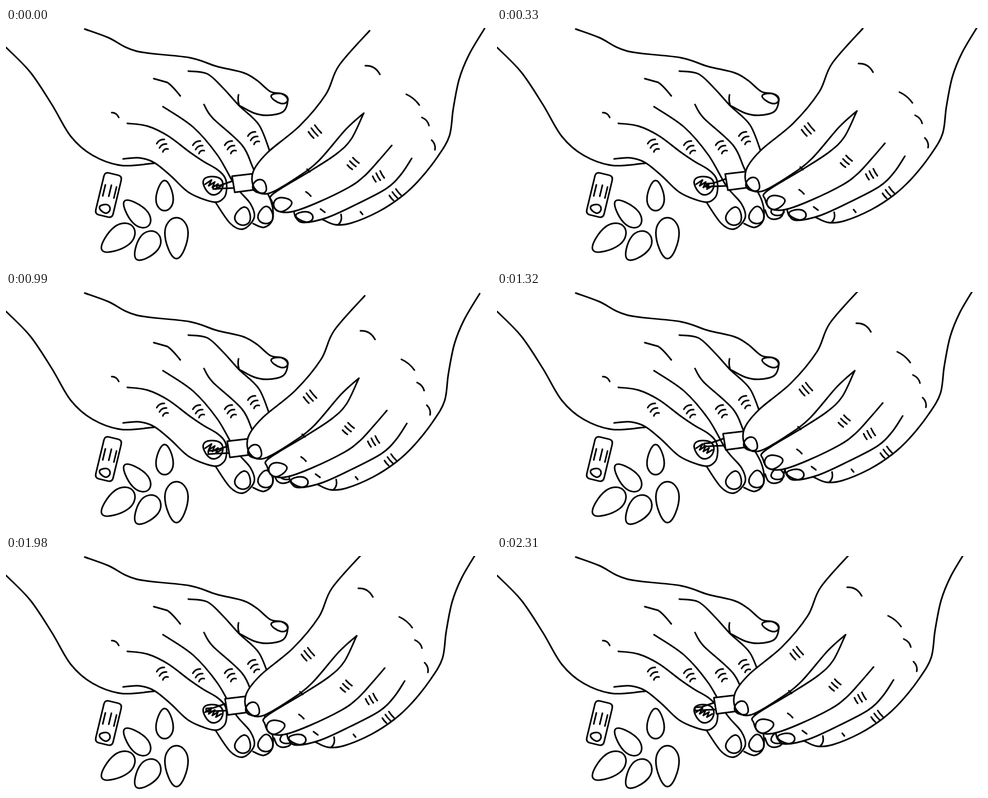
Recreate the animation shown at these times as an HTML page. Size 899 by 438 pixels, loop 2.64 s.

```html
<!DOCTYPE html>
<html lang="en">
<head>
<meta charset="utf-8">
<title>Painting nails</title>
<style>
html, body { margin: 0; width: 100%; height: 100%; overflow: hidden; background: #fff; }
svg { display: block; width: 899px; height: 438px; }
path, rect { stroke: #000; stroke-width: 3; stroke-linecap: round; stroke-linejoin: round; fill: none; }
.solid { fill: #fff; }
</style>
</head>
<body>
<svg viewBox="0 0 899 438">
  <g id="still"></g>
  <g id="fingertip"></g>
  <g id="bottle"></g>
  <g id="edge"></g>
  <g id="hand"></g>
</svg>
<script>
const STEP = 330;
// Position of the painting hand at each step
const poses = [[0, 0], [4, -4], [8, -8], [-9, 2], [0, -12], [-14, -8], [-13, -10], [-17, -12]];
const LAGGING = 5, lagPose = [1, -12]; // here the outer edge of the hand lags behind

const layer = id => document.getElementById(id);

function add(id, d, attrs = {}) {
  const path = document.createElementNS("http://www.w3.org/2000/svg", "path");
  for (const [name, value] of Object.entries({ d, ...attrs })) path.setAttribute(name, value);
  layer(id).append(path);
}
const place = (x, y, angle) => ({ transform: `translate(${x} ${y}) rotate(${angle})` });
const solid = { class: "solid" };

// Smooth curve through key points written as "x,y x,y ..."
function curve(id, text, attrs) {
  const p = text.split(" ").map(s => s.split(",").map(Number));
  const at = i => p[Math.max(0, Math.min(p.length - 1, i))];
  let d = "M" + p[0];
  for (let i = 0; i < p.length - 1; i++) {
    const [a, b, c, e] = [at(i - 1), at(i), at(i + 1), at(i + 2)];
    d += "C" + [0, 1].map(k => b[k] + (c[k] - a[k]) / 6)
      + " " + [0, 1].map(k => c[k] - (e[k] - b[k]) / 6) + " " + c;
  }
  add(id, d, attrs);
}

// Egg with half width w and half height h, narrow end up before turning
function egg(id, x, y, w, h, angle) {
  add(id, `M0 ${-h}C${w / 2} ${-h} ${w} ${-h / 5} ${w} ${h / 4}S${w / 2} ${h} 0 ${h}`
    + `S${-w} ${h * .7} ${-w} ${h / 4}S${-w / 2} ${-h} 0 ${-h}Z`, place(x, y, angle));
}

// Three short creases side by side over a knuckle
function knuckle(id, x, y, angle, gap, sizes, bow) {
  const d = sizes.map((l, i) => `M${-l / 2} ${(i - 1) * gap}q${l / 2} ${bow} ${l} 0`);
  add(id, d.join(""), place(x, y, angle));
}
const leftKnuckle = (x, y) => knuckle("still", x, y, -29, 9.5, [16, 15, 11], -5);
const rightKnuckle = (x, y, angle, size) =>
  knuckle("hand", x, y, angle, 8.5, [size, size, size * .8], 1);

// Resting hand
curve("still", "146,2 190,18 242,43 340,55 390,71 440,83 465,97 490,118 511,122 522,133 514,155 485,162 460,158 431,143");
curve("still", "0,36 45,82 85,142 120,201 160,236 213,255 275,251");
curve("still", "217,243 247,241 275,250 306,275 340,306 385,323 404,315 409,298 406,278 392,263 365,247 340,230 300,200 262,182 225,177");
curve("still", "291,146 347,184 392,236 425,293 453,326 460,352 440,373 416,363 388,323");
curve("still", "367,142 383,167 438,218 460,264 490,318 494,355 478,370 458,363");
curve("still", "338,80 373,85 402,111 432,144 469,180 490,232");
add("still", "M431 124q-2 10 1 19M196 157q9 0 13 9M274 94L299 101Q308 107 323 126");
egg("still", 507, 130, 9, 16, -75);
egg("still", 383, 291, 17, 19, -60);
egg("still", 439.5, 349, 14.5, 17, 15);
egg("still", 481.5, 347, 14, 16, 8);
leftKnuckle(291, 219);
leftKnuckle(358, 222);
leftKnuckle(417, 222);
leftKnuckle(460, 205);

// Paint strokes on the nail
let zigzag = "M369 290";
for (let i = 0; i < 4; i++) zigzag += `L${369 + 6.7 * i} ${290 + 3 * i}L${381 + 6 * i} ${282 + 3.7 * i}`;
add("still", zigzag);

// Loose nails and the small pack
egg("still", 294, 311, 16, 28, 0);
egg("still", 242, 344, 17, 32, -44);
egg("still", 316, 390, 21.5, 38, 180);
egg("still", 207, 391, 21, 36, -127);
egg("still", 261, 405, 20, 31, -142);
egg("still", 183, 335, 8, 10, -75);
add("still", "M-8.500 -40h17q8 0 8 8v64q0 8 -8 8h-17q-8 0 -8 -8v-64q0 -8 8 -8z"
  + "M-10 -17v21M1 -19v21M11 -18v21", place(190, 310, 13.5));

// Tip of the resting index finger
curve("fingertip", "497,338 503,351 515,355 528,349 533,332");
egg("fingertip", 520, 338, 12, 10, 0);

// Brush and bottle
add("bottle", "M420 284L397 292L384 293V299L397 298L421 297");
add("bottle", "M470 269L419 275L424 305L470 299", solid);

// Painting hand, from the far finger to the thumb
curve("edge", "586,355 610,365 640,362 690,341 733,313 766,282 800,239 822,200 829,150 840,95 858,50 887,1", solid);
add("edge", "M621 346q3 12 -5 19");
curve("hand", "534,342 538,353 552,361 595,352 650,327 705,298 732,272 752,242", solid);
curve("hand", "663,158 640,206 612,234 563,266 496,307 493,322 503,339 530,341 575,325 635,296 664,275 690,247 715,218", solid);
curve("hand", "674,5 617,70 593,123 545,181 485,231 458,267 461,298 487,307 540,277 580,246 630,188 663,158", solid);
add("hand", "M558 262l5 5");
egg("hand", 471, 295, 12.5, 13.5, 135);
egg("hand", 513, 327, 13, 17, 78);
egg("hand", 553, 350, 9.5, 16, -82);
rightKnuckle(572, 193, 50, 19);
rightKnuckle(643, 252, 42, 15);
rightKnuckle(690, 276, 60, 15);
rightKnuckle(721, 310, 50, 15);
add("hand", "M666 70q18 -1 27 16M742 123q15 7 24 20M771 166q11 5 13 15M789 208q8 8 6 18"
  + "M556 304q5 3 9 8M583 336l8 6M657 341l4 5");

const move = (id, [x, y]) => layer(id).setAttribute("transform", `translate(${x} ${y})`);

function draw(now) {
  const step = Math.floor(now / STEP) % poses.length;
  move("bottle", poses[step]);
  move("hand", poses[step]);
  move("edge", step === LAGGING ? lagPose : poses[step]);
  layer("fingertip").style.display = step ? "" : "none";
  requestAnimationFrame(draw);
}
draw(0);
</script>
</body>
</html>
```
